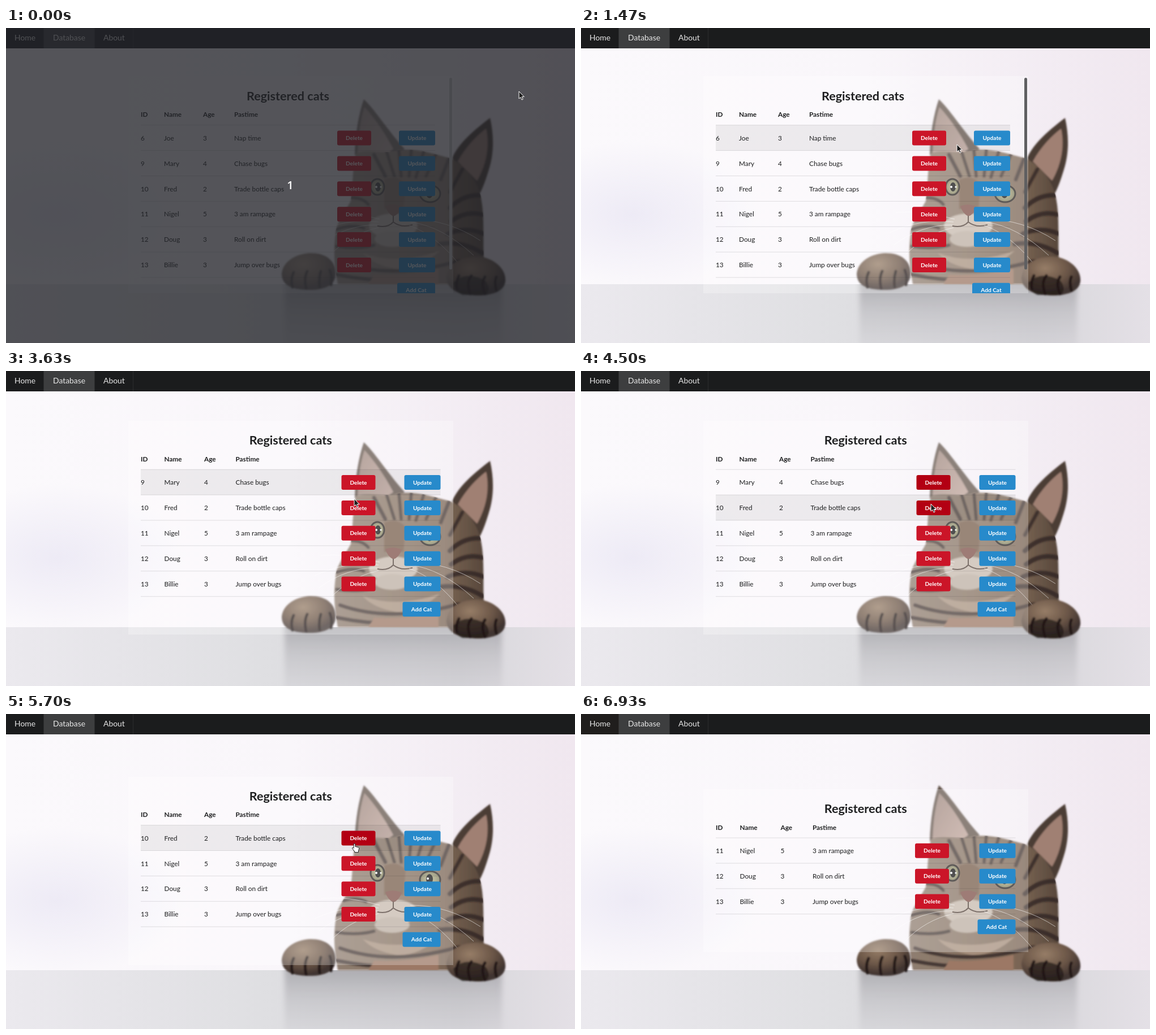
These frames come from a looping animation (1005x557 px, 7.63 s). An HTML page:

```html
<!DOCTYPE html>
<html lang="en">
<head>
<meta charset="utf-8">
<title>Registered cats</title>
<style>
  html, body { margin: 0; width: 100%; height: 100%; overflow: hidden; background: #f7f4f8; }
  svg { display: block; width: 100%; height: 100%; }
  text { font-family: Lato, sans-serif; font-size: 11.8px; fill: #1d1e1f; }
  .bold { font-weight: 700; }
  .title { font-size: 21.6px; font-weight: 700; text-anchor: middle; }
  .label { font-size: 10.15px; font-weight: 700; fill: #fff; text-anchor: middle; }
  .nav text { font-size: 13.9px; fill: #e8e8e8; }
  .line { stroke: #222426; stroke-opacity: .13; }
  .red { fill: #cb1528; }
  .red.dark { fill: #b30013; }
  .blue { fill: #278acb; }
  .hover { fill: #000; fill-opacity: 0; }
  .hover.on { fill-opacity: .06; }
  .count { font: 600 20px "Open Sans", sans-serif; fill: #fff; text-anchor: middle; }
</style>
</head>
<body>
<svg viewBox="0 0 1005 557" preserveAspectRatio="none">
  <defs>
    <linearGradient id="wall">
      <stop offset="0" stop-color="#fbf9fc"/><stop offset=".5" stop-color="#f9f6fa"/>
      <stop offset=".85" stop-color="#f2ebf2"/><stop offset="1" stop-color="#f0e7ef"/>
    </linearGradient>
    <radialGradient id="haze">
      <stop offset="0" stop-color="#eae7f4" stop-opacity=".8"/><stop offset="1" stop-color="#eae7f4" stop-opacity="0"/>
    </radialGradient>
    <linearGradient id="desk">
      <stop offset="0" stop-color="#ebe9ee"/><stop offset=".45" stop-color="#dfdfe2"/>
      <stop offset=".8" stop-color="#d8d7db"/><stop offset="1" stop-color="#e4e0e6"/>
    </linearGradient>
    <linearGradient id="mirror" x2="0" y2="1">
      <stop offset="0" stop-color="#8c8b90" stop-opacity=".62"/>
      <stop offset=".45" stop-color="#a9a8ad" stop-opacity=".4"/>
      <stop offset="1" stop-color="#b5b4ba" stop-opacity=".12"/>
    </linearGradient>
    <linearGradient id="coat">
      <stop offset="0" stop-color="#8f7e70"/><stop offset=".4" stop-color="#877363"/>
      <stop offset=".75" stop-color="#796453"/><stop offset="1" stop-color="#57473b"/>
    </linearGradient>
    <linearGradient id="earL" x1="0" y1="0" x2="1" y2="1">
      <stop offset="0" stop-color="#9c857c"/><stop offset="1" stop-color="#c4a99f"/>
    </linearGradient>
    <radialGradient id="paw" cx=".4" cy=".3" r=".65">
      <stop offset="0" stop-color="#967d67"/><stop offset=".6" stop-color="#6b5647"/><stop offset="1" stop-color="#413430"/>
    </radialGradient>
    <radialGradient id="iris">
      <stop offset=".3" stop-color="#a9a77f"/><stop offset="1" stop-color="#7d7b5c"/>
    </radialGradient>
    <filter id="soft" x="-20%" y="-20%" width="140%" height="140%"><feGaussianBlur stdDeviation="1.5"/></filter>
    <filter id="mist" x="-40%" y="-40%" width="180%" height="180%"><feGaussianBlur stdDeviation="5"/></filter>
    <clipPath id="body"><use href="#torso"/></clipPath>
    <clipPath id="frame"><rect id="clip" x="216" width="574"/></clipPath>
    <clipPath id="top"><rect y="453" width="1005" height="104"/></clipPath>
  </defs>

  <rect width="1005" height="557" fill="url(#wall)"/>
  <ellipse cx="90" cy="330" rx="230" ry="130" fill="url(#haze)"/>
  <rect y="453" width="1005" height="104" fill="url(#desk)"/>
  <g clip-path="url(#top)">
    <rect x="492" y="448" width="384" height="120" fill="url(#mirror)" filter="url(#mist)"/>
  </g>

  <g id="cat">
    <g filter="url(#soft)">
      <path d="M616 224C617 186 623 152 632 126C650 142 672 178 704 214L650 250Z" fill="#65564d"/>
      <path d="M621 222C622 186 627 160 633 140C650 158 668 184 684 214L650 238Z" fill="url(#earL)"/>
      <path d="M788 230C800 202 830 178 855 159C862 190 862 222 853 250C847 270 842 284 834 298Z" fill="#4c3d35"/>
      <path d="M798 236C812 210 832 190 848 178C854 206 850 238 832 270Z" fill="#a08073"/>
      <path id="torso" fill="url(#coat)" d="M618 222C640 212 664 224 690 217C722 211 752 222 784 230C812 244 830 266 838 296C846 330 842 372 844 412L838 453H586C580 420 578 395 582 366C582 346 597 328 609 306C613 274 612 246 618 222Z"/>
    </g>
    <g clip-path="url(#body)">
      <g fill="none" stroke="#2f2520" stroke-opacity=".75" stroke-linecap="round" filter="url(#soft)">
        <path stroke-width="5" d="M672 218L686 262M694 216L698 262M716 214L712 262M738 218L724 264M760 222L742 262"/>
        <path stroke-width="6" d="M650 224L670 262M782 232L768 268M806 250L784 290"/>
        <path stroke-width="8" d="M838 296Q808 294 784 318M842 330Q812 322 786 342M844 364Q812 350 780 364M842 398Q806 376 766 382"/>
        <path stroke-width="5" d="M610 300Q630 300 640 312M596 330Q618 322 636 332M584 356Q612 346 632 354M584 386Q620 392 650 384"/>
        <path stroke-width="6" d="M590 414Q680 446 800 412M584 436Q664 452 730 444"/>
      </g>
      <g filter="url(#soft)">
        <path d="M668 268Q692 258 706 276L702 320H668Z" fill="#775d4b"/>
        <ellipse cx="684" cy="350" rx="43" ry="22" fill="#c6b9ad"/>
        <ellipse cx="682" cy="373" rx="31" ry="14" fill="#bcafa3"/>
        <path d="M630 398Q690 420 766 394Q730 428 690 426Q650 420 630 398Z" fill="#b59f8b" opacity=".7"/>
        <path d="M650 436Q700 440 764 426V453H640Z" fill="#9c7865"/>
      </g>
    </g>
    <g stroke="#2b2522" stroke-width="3">
      <ellipse cx="656" cy="281" rx="12" ry="14" fill="url(#iris)"/>
      <ellipse cx="749" cy="293" rx="18" ry="15" fill="url(#iris)"/>
    </g>
    <ellipse cx="657" cy="281" rx="5" ry="8" fill="#151515"/>
    <ellipse cx="748" cy="292" rx="6" ry="9" fill="#151515"/>
    <g fill="#fff"><circle cx="654" cy="281" r="2"/><circle cx="662" cy="281" r="1.6"/><circle cx="745" cy="291" r="2"/></g>
    <path d="M670 315Q684 309 699 316Q694 330 684 333Q674 328 670 315Z" fill="#7d5048"/>
    <path d="M684 332V343Q674 354 656 350M684 343Q698 354 718 348" fill="none" stroke="#514139" stroke-width="2"/>
    <g fill="none" stroke="#fff" stroke-opacity=".6" stroke-width=".9">
      <path d="M658 343Q600 336 545 362M656 348Q600 348 552 384M658 353Q608 364 572 402M660 338Q606 322 556 326"/>
      <path d="M714 343Q770 350 826 402M712 349Q760 366 802 420M714 338Q780 338 838 376"/>
    </g>
    <g filter="url(#soft)">
      <path d="M487 434C489 414 510 399 538 398C566 398 584 412 582 438C580 458 556 464 532 463C506 462 487 456 487 434Z" fill="url(#paw)"/>
      <path d="M778 442C780 418 800 405 830 404C858 404 884 424 882 448C880 466 858 473 832 473C804 472 780 466 778 442Z" fill="url(#paw)"/>
      <g fill="none" stroke="#211916" stroke-width="5" stroke-linecap="round">
        <path d="M506 458Q502 444 508 432M530 460Q526 442 532 430M554 458Q552 442 556 430M574 454Q577 440 572 428"/>
        <path d="M796 462Q794 448 800 438M820 470Q812 450 822 438M846 470Q838 452 846 440M866 464Q862 448 866 440"/>
      </g>
      <path d="M790 450Q812 428 846 446Q858 460 848 472H806Q792 466 790 450Z" fill="#201917" opacity=".7"/>
    </g>
  </g>

  <rect id="panel" x="216" width="574" fill="#fff" fill-opacity=".25"/>
  <g id="tables" clip-path="url(#frame)"></g>
  <rect id="bar" x="783" y="88" width="5" height="339" rx="2.5"/>

  <g class="nav">
    <rect width="1005" height="36" fill="#1b1c1d"/>
    <rect id="home" width="67" height="36" fill="#201e1d"/>
    <rect x="67" width="89" height="36" fill="#3d3e3f"/>
    <path d="M66.5 0V36M156.5 0V36M224.5 0V36" stroke="#fff" stroke-opacity=".08"/>
    <text x="15" y="22.3">Home</text><text x="83" y="22.3">Database</text><text x="172" y="22.3">About</text>
  </g>

  <g id="dim">
    <rect width="1005" height="557" fill="#222429" fill-opacity=".77"/>
    <text class="count" x="502" y="285">1</text>
  </g>

  <g id="cursor" stroke-linejoin="round">
    <path id="arrow" d="M0 0V13L3 10.4L5 15L7.2 14L5.2 9.6H9.2Z" fill="#1c1c1c" stroke="#fff" stroke-width="1"/>
    <path id="hand" d="M-1.4 1Q0 -.6 1.4 1V5.4L6.8 6.6Q8.4 7.2 8.2 9L7 13V15.6H.2V14L-4 8.8Q-4.2 6.8-2.2 7.6L-1.4 8.4Z" fill="#fff" stroke="#222" stroke-width="1"/>
  </g>
</svg>

<script>
const LOOP = 7630, PITCH = 44.9, LAG = 70;
const $ = id => document.getElementById(id);

const cats = [
  [6, "Joe", 3, "Nap time"], [9, "Mary", 4, "Chase bugs"], [10, "Fred", 2, "Trade bottle caps"],
  [11, "Nigel", 5, "3 am rampage"], [12, "Doug", 3, "Roll on dirt"], [13, "Billie", 3, "Jump over bugs"]
];

// One layout per number of deleted cats
const layouts = [
  { from: 0, top: 85, bottom: 469, line: 171.7, cols: [238, 279, 348, 403], del: 585, right: 758 },
  { from: 2730, top: 88, bottom: 466, line: 174.2, cols: [238, 279.5, 350, 405.5], del: 592.5, right: 767.5 },
  { from: 4530, top: 111, bottom: 444, line: 196.6, cols: [238, 279.5, 350, 405.5], del: 592.5, right: 767.5 },
  { from: 5770, top: 133, bottom: 421, line: 219, cols: [238, 280.5, 352.5, 409], del: 590, right: 767.5 }
];

// Pointer path: time, x, y
const path = [
  [700, 906, 112], [1400, 664, 206], [1470, 664, 206], [2130, 615.5, 191], [3590, 615.5, 191],
  [3630, 615, 226], [3850, 622, 296], [4250, 615, 197], [4350, 615, 197], [4480, 618, 235],
  [4870, 618, 235], [5500, 615.5, 229], [6130, 615.5, 229], [6400, 237, 146],
  [6630, 237, 146], [6930, 12, -22]
];
const handTimes = [[1700, 3610], [4150, 4400], [5050, 6150]];
const pressed = [4300, 4530];

const within = (t, [a, b]) => t >= a && t < b;
const show = (el, on) => el.setAttribute("visibility", on ? "visible" : "hidden");

function add(parent, tag, attrs, text) {
  const el = document.createElementNS(parent.namespaceURI, tag);
  for (const key in attrs) el.setAttribute(key, attrs[key]);
  if (text !== undefined) el.textContent = text;
  parent.append(el);
  return el;
}

function button(parent, x, mid, width, label, color) {
  const box = add(parent, "rect", { x, y: mid - 13, width, height: 26, rx: 3, class: color });
  add(parent, "text", { x: x + width / 2, y: mid + 3.6, class: "label" }, label);
  return box;
}

function buildTable(layout, index) {
  const { line, cols, del, right } = layout;
  const g = layout.group = add($("tables"), "g", {});
  const rule = y => add(g, "path", { d: `M238 ${y}H${right}`, class: "line" });
  add(g, "text", { x: (238 + right) / 2, y: line - 44, class: "title" }, "Registered cats");
  ["ID", "Name", "Age", "Pastime"].forEach((name, i) =>
    add(g, "text", { x: cols[i], y: line - 14.4, class: "bold" }, name));
  rule(line);
  layout.rows = cats.slice(index).map((cat, i) => {
    const y = line + i * PITCH, mid = y + 22.8;
    const hover = add(g, "rect", { x: 238, y, width: right - 238, height: PITCH, class: "hover" });
    rule(y + PITCH);
    cat.forEach((value, c) => add(g, "text", { x: cols[c], y: mid + 4.2 }, value));
    const red = button(g, del, mid, 60, "Delete", "red");
    button(g, right - 64, mid, 64, "Update", "blue");
    return { hover, red, mid };
  });
  const end = line + layout.rows.length * PITCH;
  button(g, right - 67, end + 22.6, 67, "Add Cat", "blue");
}

function pointer(t) {
  const next = path.findIndex(p => p[0] > t);
  if (next === 0) return path[0].slice(1);
  if (next < 0) return path[path.length - 1].slice(1);
  const [t0, x0, y0] = path[next - 1], [t1, x1, y1] = path[next];
  const k = (t - t0) / (t1 - t0), e = k * k * (3 - 2 * k);
  return [x0 + (x1 - x0) * e, y0 + (y1 - y0) * e];
}

function render(t) {
  const current = layouts.findLast(l => t >= l.from);
  const [x, y] = pointer(t), [lx, ly] = pointer(t - LAG);
  layouts.forEach(l => show(l.group, l === current));

  const { top, bottom, line, del, right, rows } = current;
  for (const el of [$("panel"), $("clip")]) {
    el.setAttribute("y", top);
    el.setAttribute("height", bottom - top);
  }
  // Row highlights trail slightly behind the pointer
  const active = lx > 238 && lx < right ? Math.floor((ly - line) / PITCH) : -1;
  rows.forEach(({ hover, red, mid }, i) => {
    const over = x > del && x < del + 60 && Math.abs(y - mid) < 13;
    hover.classList.toggle("on", i === active);
    red.classList.toggle("dark", over || (i === 0 && within(t, pressed)));
  });

  show($("bar"), current === layouts[0]);
  $("bar").setAttribute("fill", t < 1470 ? "#cbcacc" : "#5f5f61");
  show($("home"), t > 6860);
  show($("dim"), t < 30);

  const hand = handTimes.some(span => within(t, span));
  show($("hand"), hand);
  show($("arrow"), !hand);
  $("cursor").setAttribute("transform", `translate(${x} ${y})`);
}

layouts.forEach(buildTable);
const start = performance.now();
function tick() {
  render((performance.now() - start) % LOOP);
  requestAnimationFrame(tick);
}
tick();
</script>
</body>
</html>
```
